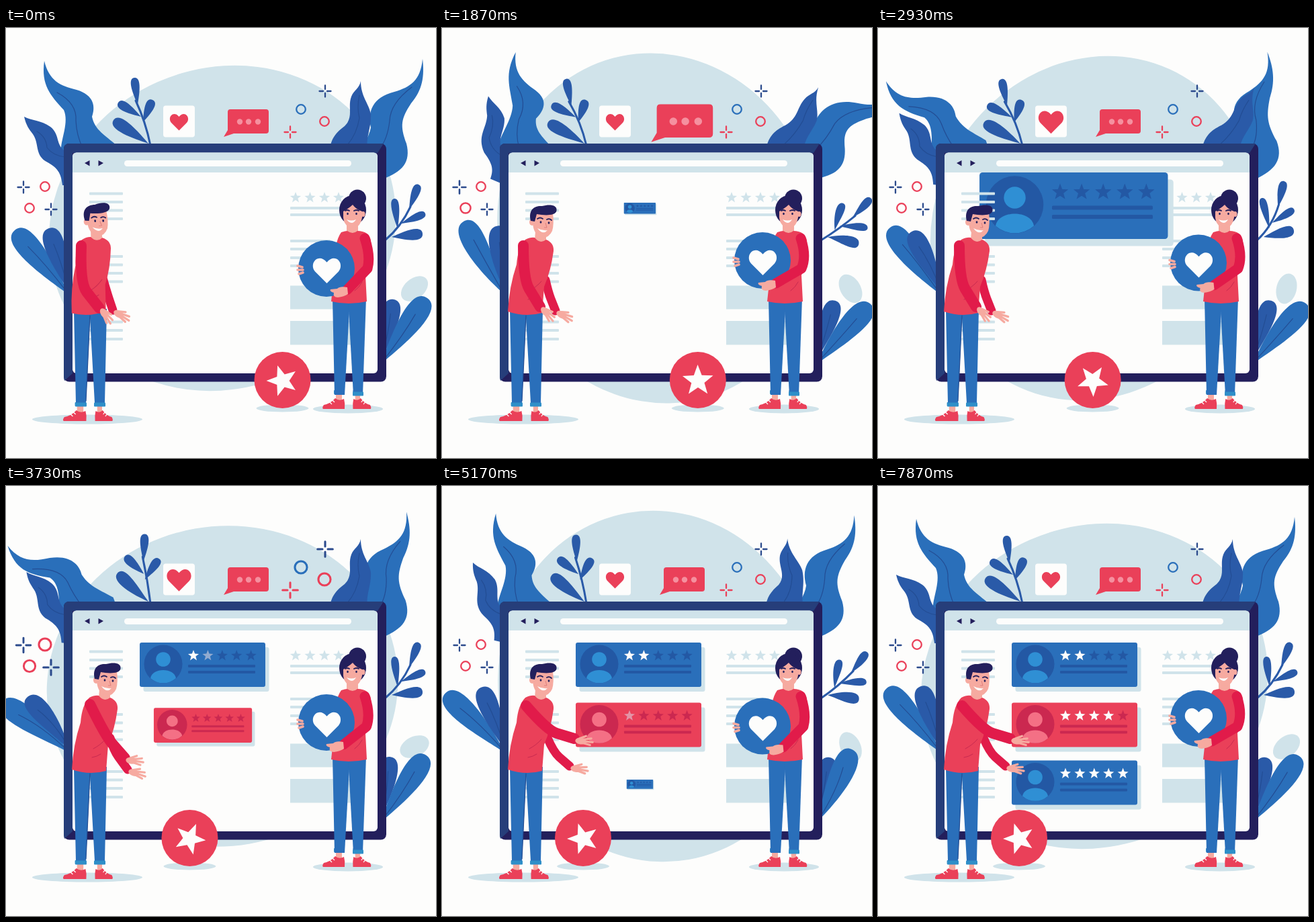
These frames come from a looping animation (640 by 640 pixels, 7930 ms). An HTML page:

```html
<!DOCTYPE html>
<html lang="en">
<head>
<meta charset="utf-8">
<title>Customer reviews</title>
<style>
  html, body { margin: 0; width: 100%; height: 100%; overflow: hidden; background: #fdfdfc; }
  svg { display: block; width: 100%; height: 100%; }
  .blue { fill: #2a6fba; } .deep { fill: #2a5aa8; } .red { fill: #ea4059; } .pale { fill: #d0e3ea; }
  .navy { fill: #231f5c; } .skin { fill: #f6aaa0; } .white { fill: #fdfdfc; } .teal { fill: #2f8fc8; }
  .vein { fill: none; stroke: #234d94; stroke-width: 1.2; stroke-linecap: round; }
  .stem { fill: none; stroke: #2a5aa8; stroke-width: 3; stroke-linecap: round; }
  .sleeve { fill: none; stroke: #e11b4a; stroke-linejoin: round; stroke-linecap: round; }
  .finger { fill: none; stroke: #f6aaa0; stroke-width: 3.6; stroke-linecap: round; }
  .fold { fill: none; stroke: #c82a50; stroke-width: 1; stroke-linecap: round; }
  .ink { fill: none; stroke: #231f5c; stroke-width: 1.8; stroke-linecap: round; }
</style>
</head>
<body>
<svg id="stage" viewBox="0 0 640 640"></svg>
<script>
const LOOP = 7930;
const TIMES = [0, 1870, 2930, 3730, 5170, 6330, 7200];
const BLUE = '#2a6fba', RED = '#ea4059', NAVY = '#2b4a8c';

// Smooth curve through the given points that never overshoots them.
function curve(t, values, times = TIMES) {
  const last = times.length - 1;
  if (t <= times[0]) return values[0];
  if (t >= times[last]) return values[last];
  const slope = i => (values[i + 1] - values[i]) / (times[i + 1] - times[i]);
  const tangent = i => {
    if (i === 0 || i === last) return 0;
    const a = slope(i - 1), b = slope(i);
    return a * b > 0 ? 2 * a * b / (a + b) : 0;
  };
  let i = 0;
  while (t > times[i + 1]) i++;
  const h = times[i + 1] - times[i], u = (t - times[i]) / h, v = 1 - u;
  return v * v * (1 + 2 * u) * values[i] + u * u * (3 - 2 * u) * values[i + 1]
    + h * u * v * (v * tangent(i) - u * tangent(i + 1));
}
const clamp = x => Math.max(0, Math.min(1, x));
const mix = (a, b, u) => a + (b - a) * u;
const bump = (t, centre, width) => {
  const d = Math.abs(t - centre) / width;
  return d < 1 ? Math.cos(d * Math.PI / 2) : 0;
};

const rect = (x, y, w, h, cls, r = 0) =>
  `<rect x="${x}" y="${y}" width="${w}" height="${h}" rx="${r}" class="${cls}"/>`;
const oval = (x, y, rx, ry, cls) =>
  `<ellipse cx="${x}" cy="${y}" rx="${rx}" ry="${ry}" class="${cls}"/>`;
const shape = (d, cls) => `<path d="${d}" class="${cls}"/>`;
const bars = (x, w, ys, cls) => ys.map(y => rect(x, y - 2, w, 4, cls, 1)).join('');

function star(x, y, r, cls) {
  const points = [];
  for (let i = 0; i < 10; i++) {
    const q = i % 2 ? r * .42 : r, a = i * Math.PI / 5;
    points.push((x + q * Math.sin(a)).toFixed(1) + ',' + (y - q * Math.cos(a)).toFixed(1));
  }
  return `<polygon points="${points.join(' ')}" class="${cls}"/>`;
}

// Narrow at its base, round at its tip.
function leaf(x, y, tx, ty, width, cls, vein = false) {
  const dx = tx - x, dy = ty - y, len = Math.hypot(dx, dy), w = width / 1.1;
  const nx = -dy / len * w, ny = dx / len * w;
  const side = (k, m) => `${(x + dx * k + nx * m).toFixed(2)} ${(y + dy * k + ny * m).toFixed(2)}`;
  return shape(`M${x} ${y}C${side(.35, .35)} ${side(1, 1)} ${tx} ${ty}C${side(1, -1)} ${side(.35, -.35)} ${x} ${y}Z`, cls)
    + (vein ? shape(`M${side(.05, 0)}Q${side(.45, .08)} ${side(.75, -.02)}`, 'vein') : '');
}

const sway = (x, y, turns, body) =>
  `<g class="sway" data-pivot="${x} ${y}" data-turns="${turns}">${body}</g>`;

const HEART = 'M0 12.5L-11.5 1C-18 -7 -8 -18 0 -8C8 -18 18 -7 11.5 1Z';

function spark(x, y, colour, ring, lag = 0) {
  const body = ring ? '<circle r="6.8"/>' : '<path d="M0 -8.5V-3M0 8.5V3M-8.5 0H-3M8.5 0H3"/>';
  return `<g class="spark" data-x="${x}" data-y="${y}" data-lag="${lag}" fill="none" stroke="${colour}"
    stroke-width="2.3" stroke-linecap="round">${body}</g>`;
}

// Review cards scale about the centre of the panel and its shadow together.
const BLUE_CARD = { back: 'blue', dark: '#2358a4', face: '#2f8fd4' };
const RED_CARD = { back: 'red', dark: '#cb2850', face: '#f47085' };
const CARDS = [
  { y: 269, start: 1770, stars: 2, ...BLUE_CARD },
  { y: 358.5, start: 3420, stars: 4, ...RED_CARD },
  { y: 444.5, start: 5085, stars: 5, ...BLUE_CARD }
];
function card(c, i) {
  let s = rect(-88, -26, 187, 66, 'pale', 3) + rect(-93.5, -33, 187, 66, c.back, 3)
    + `<circle cx="-58.5" cy="-1" r="28.5" fill="${c.dark}"/>
      <g fill="${c.face}"><circle cx="-58.5" cy="-8" r="10.8"/>
      <path d="M-77.5 20C-75 4 -42 4 -39.5 20A28.5 28.5 0 0 1 -77.5 20Z"/></g>
      <g fill="${c.dark}">`;
  for (let k = 0; k < 5; k++) s += star(-13.5 + 21.4 * k, -13.5, 8.5, '');
  s += bars(-21.5, 100, [2, 11], '') + '</g>';
  for (let k = 0; k < c.stars; k++) s += star(-13.5 + 21.4 * k, -13.5, 8.5, 'white lit');
  return `<g class="card" id="card${i}"><g transform="translate(-2.5 -3)">${s}</g></g>`;
}

const hand = id => `<g id="${id}">
  <ellipse cx="6" rx="9" ry="5.5" class="skin"/>
  <path class="finger" d="M10 -3L23 -6M12 0L26 0M11 3L22 5M4 -4L14 -9"/></g>`;

const shoe = (x, y, dir) => `<g transform="translate(${x} ${y}) scale(${dir} 1)">
  ${rect(-4, -21, 9, 12, 'skin')}${rect(-8, -26, 16, 6, 'teal', 1)}
  ${shape('M-7 -13Q0 -9 6 -14Q13 -6 23 -4Q26 0 24 2H-8Q-9 -6 -7 -13Z', 'red')}
  <path d="M7 -8L11 -12M11 -5L15 -9" stroke="#fdfdfc" stroke-width="1.3"/></g>`;

const backdrop = `
  <ellipse id="blob" cx="322" cy="298" rx="262" ry="238" class="pale"/>
  <ellipse id="bud" cx="608" cy="388" rx="15" ry="23" class="pale"/>
  ${sway(120, 192, '0 20 -20 -25 9 9 0',
    shape('M57 49C64 78 80 86 105 92C132 100 133 118 128 132C132 152 148 160 164 174L170 230L95 215L82 180C82 165 94 140 86 122C66 100 52 85 57 49Z', 'blue')
    + shape('M76 96Q106 112 104 138Q105 160 114 178', 'vein'))}
  ${sway(105, 195, '0 30 4 3 15 0 0',
    shape('M27 132C38 138 52 137 66 147C80 158 74 172 86 182L102 188L102 235L84 234C82 215 76 208 62 200C42 190 50 172 40 158C34 150 30 145 27 132Z', 'deep')
    + shape('M46 154Q60 162 61 178Q70 190 88 192', 'vein'))}
  ${sway(92, 395, '0 11 3 -13 -5 0 0', leaf(94, 397, 13, 301, 36, 'blue', true))}
  ${sway(92, 395, '0 11 -8 -20 -3 -2 0', leaf(94, 392, 64, 298, 31, 'deep', true))}
  ${sway(215, 175, '0 -3.6 -4 8.6 4.6 -1 0',
    shape('M215 175Q208 140 193 108', 'stem') + leaf(196, 114, 191, 74, 13, 'deep') + leaf(204, 140, 218, 107, 14, 'deep')
    + leaf(201, 132, 167, 111, 14, 'deep') + leaf(212, 172, 160, 137, 19, 'deep'))}
  ${sway(560, 195, '0 26 -15 -9 -2.5 -4 0',
    shape('M620 46C617 78 602 88 578 95C545 103 538 125 543 148C540 165 530 175 520 190L560 225C590 214 603 200 596 172C586 145 588 135 603 112C620 92 623 72 620 46Z', 'blue')
    + shape('M604 88Q572 112 571 138Q568 165 556 180', 'vein'))}
  ${sway(515, 185, '0 18 18 0 -7.5 0 0',
    shape('M528 79C528 102 540 112 543 128C544 150 535 160 538 185L482 185C482 165 492 155 504 146C518 132 508 118 514 102C518 92 526 90 528 79Z', 'deep')
    + shape('M526 100Q522 118 526 134Q522 158 508 174', 'vein'))}
  ${sway(566, 315, '0 19 -6.5 0 14 0 0',
    shape('M564 316Q588 296 602 266', 'stem') + leaf(600, 270, 614, 233, 13, 'deep') + leaf(583, 299, 578, 254, 12, 'deep')
    + leaf(588, 291, 624, 276, 12, 'deep') + leaf(574, 311, 620, 306, 17, 'deep'))}
  ${sway(560, 495, '0 5 5 -3 0 -2 0', leaf(560, 490, 577, 404, 28, 'deep', true))}
  ${sway(560, 495, '0 7 7 -1 -9.6 -1 0', leaf(558, 500, 627, 402, 36, 'blue', true))}
  ${spark(26, 237, NAVY, false, 250)}${spark(58, 236, RED, true)}${spark(35, 268, RED, true, 250)}
  ${spark(67, 270, NAVY, false)}${spark(475, 94, NAVY, false)}${spark(439, 121, BLUE, true)}
  ${spark(474, 139, RED, true)}${spark(423, 155, RED, false)}
  ${rect(234, 115.5, 47, 47, 'white', 4)}
  <path id="like" d="${HEART}" class="red"/>
  <g id="bubble">${shape('M334 121H387Q391 121 391 125V153Q391 157 387 157H339L324 162L330 152V125Q330 121 334 121Z', 'red')}
    <g fill="#f5909f">${[348, 361, 375].map(x => oval(x, 139.5, 4.2, 4.2, '')).join('')}</g></g>`;

const monitor = `
  ${oval(121, 582.5, 82, 7, 'pale')}${oval(509, 567, 52, 6.5, 'pale')}
  ${rect(86, 172, 480, 354.5, 'navy', 8)}
  <path d="M94 172H562L553 186H99V514L87 525Q86 522 86 518V180Q86 172 94 172Z" fill="#263e7a"/>
  ${rect(99, 185.5, 454, 328.5, 'white', 6)}
  ${shape('M99 215V191.5Q99 185.5 105 185.5H547Q553 185.5 553 191.5V215Z', 'pale')}
  ${rect(176, 197, 338, 9, 'white', 4.5)}
  ${shape('M117 201L124.5 197V205.5ZM145 201L137.5 197V205.5Z', 'navy')}
  ${[431, 452.5, 474, 495].map(x => star(x, 252.5, 8.5, 'pale')).join('')}
  ${bars(423, 90, [268, 278], 'pale')}${bars(423, 60, [317, 329, 342, 354], 'pale')}
  ${rect(423, 383.5, 92, 35, 'pale')}${rect(423, 436, 92, 35.5, 'pale')}
  ${card(CARDS[0], 0)}
  ${bars(124, 50, [246.5, 259, 271.5, 284, 340, 352.5, 365, 377.5, 425, 437.5, 450, 463], 'pale')}
  ${card(CARDS[1], 1)}${card(CARDS[2], 2)}`;

const man = `
  ${shoe(111, 583, -1.05)}${shoe(139, 583, .8)}
  ${shape('M101 418H150L147 558H132L125 432L119 558H104Z', 'blue')}
  ${shape('M125 428L119 555', 'vein')}
  ${rect(103, 557.5, 17, 6, 'teal', 1)}${rect(131, 557.5, 17, 6, 'teal', 1)}
  <path id="backArm" class="sleeve" stroke-width="13"/>${hand('backHand')}
  <g id="manBody">
    ${shape('M139 303H155V318Q147 324 138 315Z', 'skin')}
    ${shape('M124 315Q132 311 138 312Q146 322 155 315Q167 320 166 332Q162 362 152 385L149 424Q124 431 98 422Q100 385 111 352Q113 326 124 315Z', 'red')}
    ${shape('M130 391Q140 386 148 377M128 404Q135 403 141 399', 'fold')}
    ${oval(134, 289, 4, 5, 'skin')}
    ${shape('M135 275H165Q167 292 164 302Q159 313 148 312Q136 307 135 290Z', 'skin')}
    ${shape('M132 287C128 270 138 264 149 265C160 262 172 263 170.5 272C169 280 152 279 141 277L138 288Z', 'navy')}
    ${shape('M142 284Q146 281 150 284M156 285Q160 283 163 286', 'ink')}
    ${oval(147, 289, 1.4, 1.8, 'navy')}${oval(159, 290, 1.4, 1.8, 'navy')}
    ${shape('M142 298Q149 302 157 301Q150 309 142 298Z', 'white')}
    <path d="M154 290L156 297H152" fill="none" stroke="#de7f7c"/>
  </g>
  <path id="frontArm" class="sleeve" stroke-width="16"/>${hand('frontHand')}`;

const ball = `<g id="ball">${oval(0, 566, 39, 5.5, 'pale')}
  <circle cy="524" r="42" class="red"/>
  <g id="ballStar">${star(0, 0, 24, 'white')}</g></g>`;

const woman = `
  ${shoe(496, 565, -1)}${shoe(523, 565, .82)}
  ${shape('M486 402H512L504 546H489Z', 'blue')}
  ${shape('M509 402H536L531 546H517Z', 'blue')}${rect(516, 541.5, 16, 6, 'teal', 1)}
  ${shape('M507 290H524V304Q515 310 507 304Z', 'skin')}
  ${shape('M499 304Q505 302 508 302Q516 308 523 302Q540 302 543 316Q544 345 535 368L537 407Q510 413 484 407L488 370Q487 320 499 304Z', 'red')}
  ${shape('M530 378Q526 386 519 391', 'fold')}
  <circle cx="523" cy="253.5" r="13" class="navy"/>
  ${oval(516, 271, 20, 22, 'navy')}
  ${shape('M502 273Q511 268 516 263Q521 270 530 273V282Q527 298 515 298Q503 295 502 282Z', 'skin')}
  ${oval(531.5, 277, 3, 4, 'skin')}
  ${shape('M505 272Q508 270 511 272M518 272Q522 270 525 272', 'ink')}
  ${oval(508.5, 276.5, 1.3, 1.7, 'navy')}${oval(521.5, 276.5, 1.3, 1.7, 'navy')}
  ${shape('M507 285Q514 288 521 285Q515 295 507 285Z', 'white')}
  <g id="disc"><circle cx="477" r="42" class="blue"/>
    <path d="${HEART}" transform="translate(477.5 3) scale(1.52)" class="white"/>
    <path class="finger" d="M434 -4L441 -2M434 2H442M436 8L442 6"/></g>
  <path id="hold" class="sleeve" stroke-width="15"/>
  <g id="holdHand">${shape('M14 -8Q3 -10 -1 -6L-11 -5Q-13 -2 -6 0Q-8 7 0 7Q9 6 15 2Z', 'skin')}</g>`;

const stage = document.getElementById('stage');
stage.innerHTML = backdrop + monitor + man + ball + woman;

const $ = id => document.getElementById(id);
const set = (el, value, name = 'transform') => el.setAttribute(name, value);

const PAIR = /(-?[\d.]+) (-?[\d.]+)/g;
const plants = [...document.querySelectorAll('.sway')].map(el => {
  const [px, py] = el.dataset.pivot.split(' ').map(Number);
  const paths = [...el.children].map(path => ({ path, d: path.getAttribute('d') }));
  const far = paths.flatMap(p => [...p.d.matchAll(PAIR)].map(m => Math.hypot(m[1] - px, m[2] - py)));
  return { px, py, paths, reach: Math.max(...far), turns: el.dataset.turns.split(' ').map(Number) };
});

// The base stays put; the turn grows along the stalk.
function bend({ px, py, paths, reach }, turn) {
  for (const { path, d } of paths) {
    set(path, d.replace(PAIR, (_, x, y) => {
      const dx = x - px, dy = y - py;
      const a = turn * Math.PI / 180 * Math.min(1, 1.5 * Math.hypot(dx, dy) / reach);
      const c = Math.cos(a), s = Math.sin(a);
      return `${(px + dx * c - dy * s).toFixed(2)} ${(py + dx * s + dy * c).toFixed(2)}`;
    }), 'd');
  }
}

const sparks = [...document.querySelectorAll('.spark')].map(el => ({ el, ...el.dataset }));
const cards = CARDS.map((c, i) => ({ ...c, el: $('card' + i), lit: [...$('card' + i).querySelectorAll('.lit')] }));

// Shoulder, elbow, wrist, then the angle of the hand.
const FRONT = [
  [112, 324, 110, 380, 139, 417, 58], [121, 324, 121, 374, 146, 415, 50],
  [125, 325, 148, 372, 177, 405, 8], [125, 327, 157, 364, 197, 376, 6]
];
const BACK = [
  [144, 372, 150, 393, 159, 420, 32], [154, 375, 158, 393, 169, 421, 30],
  [155, 375, 160, 393, 181, 422, 18], [157, 375, 166, 396, 190, 417, 10]
];
function moveArm(name, poses, p) {
  const i = Math.min(2, Math.floor(p));
  const [sx, sy, ex, ey, wx, wy, a] = poses[i].map((v, k) => mix(v, poses[i + 1][k], p - i));
  set($(name + 'Arm'), `M${sx} ${sy}Q${ex} ${ey} ${mix(ex, wx, .35)} ${mix(ey, wy, .35)}L${wx} ${wy}`, 'd');
  set($(name + 'Hand'), `translate(${wx + 4} ${wy + 3}) rotate(${a}) scale(.9)`);
}

function draw(t) {
  const spin = curve(t, [-24, 75, 120, 170, 260, 305, 336]);
  set($('blob'), `rotate(${spin} 322 298)`);
  set($('bud'), `rotate(${spin + 74} 608 388)`);
  for (const p of plants) bend(p, curve(t, p.turns));
  for (const s of sparks) {
    const beat = Math.max(0, Math.cos(2 * Math.PI * (t - 1100 - s.lag) / (LOOP / 3)));
    set(s.el, `translate(${s.x} ${s.y}) scale(${1 + .33 * beat})`);
  }
  set($('like'), `translate(257.5 140) scale(${1 + .5 * bump(t, 3300, 800)})`);
  set($('bubble'), `translate(358 141) scale(${1 + .37 * bump(t, 1870, 500)}) translate(-358 -141)`);

  for (const c of cards) {
    const age = t - c.start;
    const size = curve(age, [0, .25, .78, 1.6, 1.5, 1.37, 1], [0, 100, 310, 850, 1160, 1250, 1550]);
    set(c.el, `translate(295 ${c.y}) scale(${size})`);
    c.lit.forEach((el, k) => set(el, clamp((age - 1650 - 210 * k) / 200), 'opacity'));
  }

  set($('manBody'), `rotate(${curve(t, [-6, 0], [0, 1500])} 122 425)`);
  const reach = curve(t, [0, 1, 1, 2, 3], [0, 1500, 2950, 3730, 4500]);
  moveArm('front', FRONT, reach);
  moveArm('back', BACK, reach);

  const roll = clamp((t - 1340) / 3490);
  set($('ball'), `translate(${411.5 - 201.5 * roll} 0)`);
  set($('ballStar'), `translate(0 525) rotate(${54 - 360 * roll})`);

  const drop = curve(t, [12, 0, 3.5, 6, 11.5, 0, 0]);
  set($('disc'), `translate(0 ${346 + drop})`);
  set($('hold'), `M534 313Q543 340 ${535 + drop / 4} 358L${497 + drop * .9} ${380 + drop * .8}`, 'd');
  set($('holdHand'), `translate(${482 + drop} ${384 + drop * .83})`);
}

function frame() {
  draw(performance.now() % LOOP);
  requestAnimationFrame(frame);
}
frame();
</script>
</body>
</html>
```
